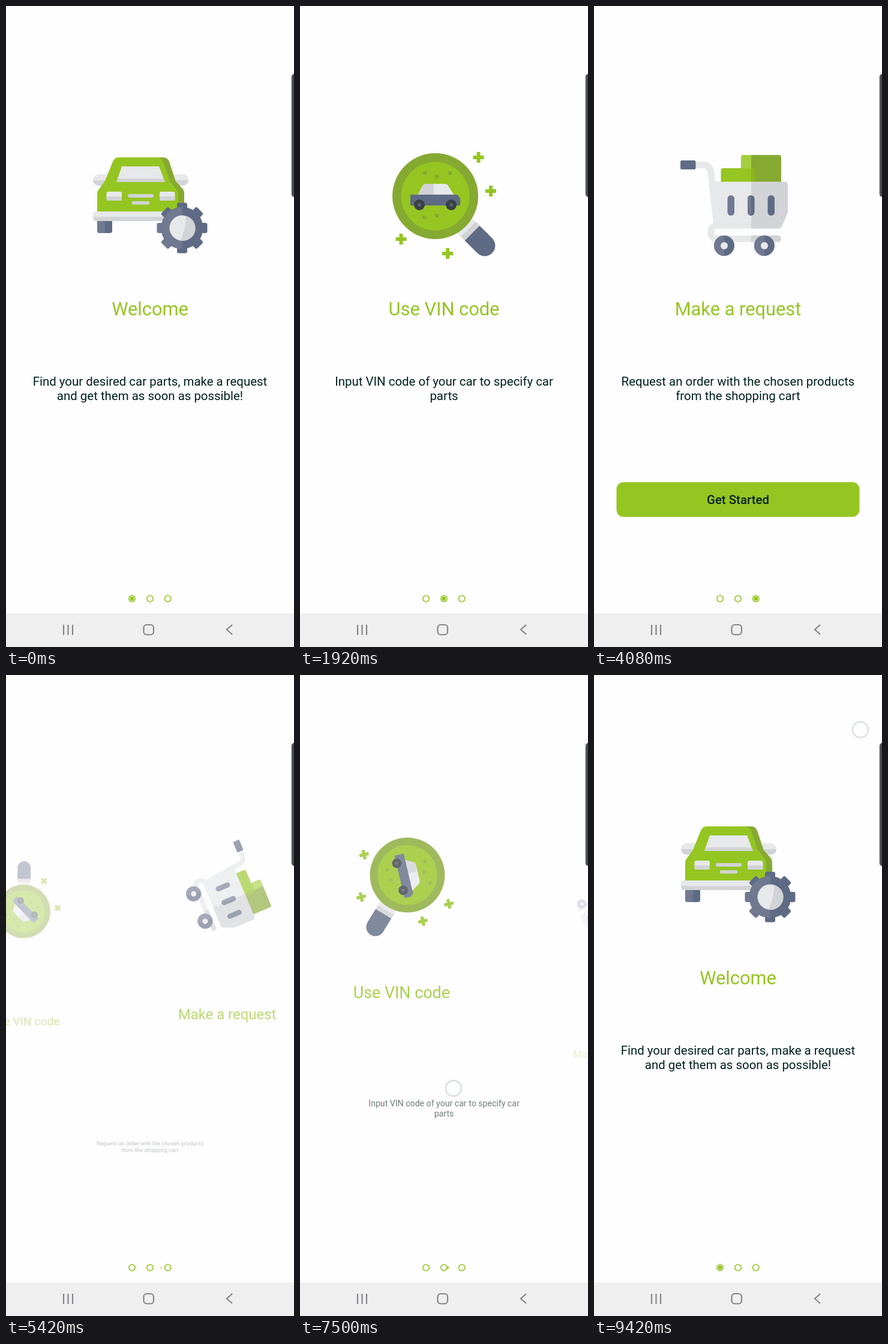
Write an HTML page that moves like this. It is 480 px wide and 1067 px high and loops after 9.51 s.

```html
<!DOCTYPE html>
<html lang="en">
<head>
<meta charset="utf-8">
<title>Onboarding</title>
<style>
  html, body { margin: 0; width: 100%; height: 100%; overflow: hidden; background: #fefdff; }
  svg { display: block; width: 100vw; height: 100vh; }
  text { font-family: Roboto, sans-serif; text-anchor: middle; }
  .title { font-size: 30.8px; fill: #95c521; }
  .note { font-size: 20.45px; fill: #00201f; }
  .green { fill: #95c521; } .olive { fill: #86a932; }
  .light { fill: #e6e8e9; } .grey { fill: #d1d3d6; }
  .slate { fill: #5f6b84; } .soft { fill: #717991; }
  .tube { fill: none; stroke: #e6e8e9; stroke-width: 11; }
  .line { fill: none; stroke: #858588; stroke-width: 2.2; }
</style>
</head>
<body>
<svg viewBox="0 0 480 1067">
  <rect width="480" height="1067" fill="#fefdff"/>
  <g id="pages"></g>
  <g id="button">
    <rect class="green" x="37.5" y="792.5" width="405" height="58" rx="12"/>
    <text class="note" x="240" y="829" font-weight="500">Get Started</text>
  </g>
  <g fill="none" stroke="#95c521" stroke-width="1.6">
    <circle cx="210" cy="986.5" r="5.2"/><circle cx="240" cy="986.5" r="5.2"/><circle cx="269.7" cy="986.5" r="5.2"/>
  </g>
  <circle id="dot" class="green" cy="986.5"/>
  <rect y="1011" width="480" height="56" fill="#efeff0"/>
  <path class="line" d="M96 1030v17M103.5 1030v17M111 1030v17M377 1030l-9 8 9 8"/>
  <rect class="line" x="229.5" y="1030" width="16.5" height="16.5" rx="5"/>
  <rect x="476" y="113" width="12" height="205" rx="5" fill="#454b4f" stroke="#8b9092"/>
  <circle id="touch" r="13" fill="none" stroke="#d3d8e2" stroke-width="2"/>
</svg>
<script>
const LOOP = 9510;
const $ = id => document.getElementById(id);

const rect = (cls, x, y, w, h, r = 0) =>
  `<rect class="${cls}" x="${x}" y="${y}" width="${w}" height="${h}" rx="${r}"/>`;
const circle = (cls, x, y, r) => `<circle class="${cls}" cx="${x}" cy="${y}" r="${r}"/>`;
const path = (cls, d, extra = '') => `<path class="${cls}" d="${d}" ${extra}/>`;
const disc = (x, y, r, dark, pale) =>
  circle(dark, x, y, r) + path(pale, `M${x} ${y - r}a${r} ${r} 0 0 0 0 ${2 * r}z`);

function carArt() {
  const lamp = x => rect('light', x, 309, 25.5, 15, 3) + path('grey', `M${x} 317h25.5v4q0 3-3 3h-19.5q-3 0-3-3z`);
  const teeth = [0, 1, 2, 3, 4, 5, 6, 7].map(i =>
    `<g transform="translate(293.5 369.5) rotate(${i * 45})">${rect(i > 4 || i == 0 || i < 3 ? 'slate' : 'soft', 30, -8.5, 12, 17, 3)}</g>`).join('');
  return rect('light', 145, 280, 30, 19, 9) + path('grey', 'M145 290h26v9h-17q-8-1-9-9z') +
    rect('light', 275, 280, 29, 19, 9) + path('grey', 'M278 290h26q-1 8-9 9h-17z') +
    rect('slate', 152, 352, 25, 26, 4) + path('soft', 'M152 352h13v26h-9q-4 0-4-4z') +
    path('olive', 'M240 252h22q7 0 10 7l11 33 12 13q2 3 2 8v34h-40z') +
    path('green', 'M152 344v-31q0-5 3-8l10-14 13-32q3-7 10-7h64q7 0 10 7l11 33 11 13q3 3 3 8v31z') +
    path('light', 'M193 267h62l10 26h-81z') + path('grey', 'M186 287h77l2 6h-81z') +
    lamp(167.5) + lamp(256) +
    rect('grey', 203, 313, 43, 6, 3) + rect('grey', 209.5, 325, 30, 5.5, 2.7) +
    rect('light', 145, 342, 140, 16, 5) + path('grey', 'M145 351h140v7h-135q-5-1-5-7z') +
    teeth + disc(293.5, 369.5, 35, 'slate', 'soft') +
    circle('light', 293.5, 369.5, 21) + path('grey', 'M300 349.5a21 21 0 0 1-9 41q9-20 9-41z');
}

function lensArt() {
  const specks = [[208, 278], [228, 284], [250, 278], [207, 352], [228, 349]]
    .map(([x, y]) => rect('olive', x - 3, y - 3, 6, 6)).join('');
  const pluses = [[297.5, 252], [318, 308], [168.5, 388], [246, 412]]
    .map(([x, y]) => path('green', `M${x - 3} ${y - 9}h6v6h6v6h-6v6h-6v-6h-6v-6h6z`)).join('');
  const wheel = x => `<circle cx="${x}" cy="331" r="9" fill="#394147"/><circle cx="${x}" cy="331" r="3" fill="#596168"/>`;
  return `<g transform="translate(225.5 316.5) rotate(45)">` +
    rect('light', 62, -17.5, 18, 35) + rect('grey', 78, -17.5, 10, 35) +
    path('slate', 'M87-17.5h29.5a17.5 17.5 0 0 1 0 35h-29.5z') + '</g>' +
    circle('olive', 225.5, 316.5, 71.5) + circle('green', 225.5, 316.5, 57) + specks + pluses +
    path('light', 'M196 315l8-15q2-4 6-4h31q4 0 6 3l10 16z') +
    path('grey', 'M196 315l8-15q2-4 6-4h13v19z') +
    path('slate', 'M184 314h78l5 6v12h-83z') + wheel(199) + wheel(252);
}

function cartArt() {
  const wheel = x => disc(x, 399, 17, 'slate', 'soft') + circle('light', x, 399, 6);
  return path('tube', 'M167 264.5h14q12 0 14 12l10 90') +
    rect('slate', 144, 257, 25.5, 15, 2.5) +
    rect('olive', 245, 248, 67, 50, 4) + path('', 'M262 248h-13q-4 0-4 4v41h17z', 'fill="#a4cf41"') +
    rect('green', 211.5, 270, 56, 28, 4) + path('', 'M262 270h2q4 0 4 4v19h-6z', 'fill="#8ab51f"') +
    path('tube', 'M206 365.5q-11 0-11 11t11 11h57') +
    path('grey', 'M262 382h44.500a5.500 5.500 0 0 1 0 11h-44.500z') +
    path('light', 'M198 292.500h64v78h-57z') +
    path('grey', 'M262 292.500h56q5 0 5 5v47l-10 22q-2 4-6 4h-45z') +
    rect('soft', 222.5, 315, 11.5, 34, 5.7) + rect('slate', 256, 315, 11.5, 34, 5.7) +
    path('soft', 'M262 315a5.700 5.700 0 0 0-6 5.700v22.600a5.700 5.700 0 0 0 6 5.700z') +
    rect('slate', 289.500, 315, 11.5, 34, 5.7) + wheel(217) + wheel(284);
}

// half: half the width of the title, which decides how far it travels off the stage
const pages = [
  { art: carArt(), title: 'Welcome', half: 63,
    note: ['Find your desired car parts, make a request', 'and get them as soon as possible!'] },
  { art: lensArt(), title: 'Use VIN code', half: 92,
    note: ['Input VIN code of your car to specify car', 'parts'] },
  { art: cartArt(), title: 'Make a request', half: 105,
    note: ['Request an order with the chosen products', 'from the shopping cart'] },
];

$('pages').innerHTML = pages.map(p =>
  `<g><g><g transform="translate(-240 -332)">${p.art}</g></g>
   <g><text class="title" y="11">${p.title}</text></g>
   <g><text class="note" y="-5">${p.note[0]}</text><text class="note" y="19">${p.note[1]}</text></g></g>`).join('');
const nodes = [...$('pages').children].map(g => [...g.children]);

// [ms, page position]
const scroll = [
  [0, 0], [850, 0], [1000, .16], [1250, .62], [1450, .9], [1650, 1],
  [2600, 1], [3000, 1.4], [3200, 1.75], [3400, 1.94], [3600, 2],
  [4450, 2], [4950, 1.564], [5300, 1.564], [5420, 1.626], [5600, 1.82], [5800, 2],
  [6750, 2], [7000, 1.72], [7500, 1.214], [7640, 1.06], [7780, 1],
  [7860, 1], [8040, .5], [8100, .36], [8300, .1], [8500, 0], [LOOP, 0],
];
// [from ms, to ms, from x, to x, y]
const touches = [
  [850, 1200, 390, 200, 688], [2600, 3100, 390, 200, 688], [4450, 5300, 100, 205, 688],
  [6750, 7540, 60, 266, 688], [7860, 8060, 80, 260, 688], [9340, LOOP, 444, 444, 91],
];

const mix = (a, b, k) => a + (b - a) * k;

function positionAt(t) {
  const i = scroll.findIndex(point => point[0] > t);
  const [t0, p0] = scroll[i - 1], [t1, p1] = scroll[i];
  return mix(p0, p1, (t - t0) / (t1 - t0));
}

function place(node, x, y, scale, alpha, turn = 0) {
  node.setAttribute('transform', `translate(${x} ${y}) rotate(${turn}) scale(${scale})`);
  node.setAttribute('opacity', Math.max(0, alpha));
}

function draw(t) {
  const position = positionAt(t);
  pages.forEach((page, i) => {
    const offset = i - position, away = Math.min(1, Math.abs(offset));
    const right = offset > 0, side = right ? 1 : -1;
    const [art, title, note] = nodes[i];
    place(art, 240 + side * 335 * away, 332 + 77 * away, 1 - (right ? .7 : .6) * away, 1 - away, (right ? 180 : 360) * away);
    place(title, 240 + side * (240 + page.half) * away, 504 + (right ? 161 : 115) * away, 1 - .6 * away, 1 - away);
    place(note, 240, 637 + 398 * away, Math.max(.25, 1 - 1.45 * away), 1 - 2 * away);
  });
  $('button').setAttribute('opacity', Math.max(0, 1 - 4 * (2 - position)));

  const between = Math.abs(position - Math.round(position));
  const dot = $('dot');
  dot.setAttribute('cx', 210 + 29.85 * position);
  dot.setAttribute('r', 3.4 * (1 - 1.4 * between));
  dot.setAttribute('opacity', 1 - 1.4 * between);

  const touch = touches.find(([from, to]) => t >= from && t < to);
  $('touch').setAttribute('visibility', touch ? 'visible' : 'hidden');
  if (touch) {
    const [from, to, x0, x1, y] = touch;
    $('touch').setAttribute('cx', mix(x0, x1, (t - from) / (to - from)));
    $('touch').setAttribute('cy', y);
  }
}

const start = performance.now();
function tick() {
  draw((performance.now() - start) % LOOP);
  requestAnimationFrame(tick);
}
tick();
</script>
</body>
</html>
```
